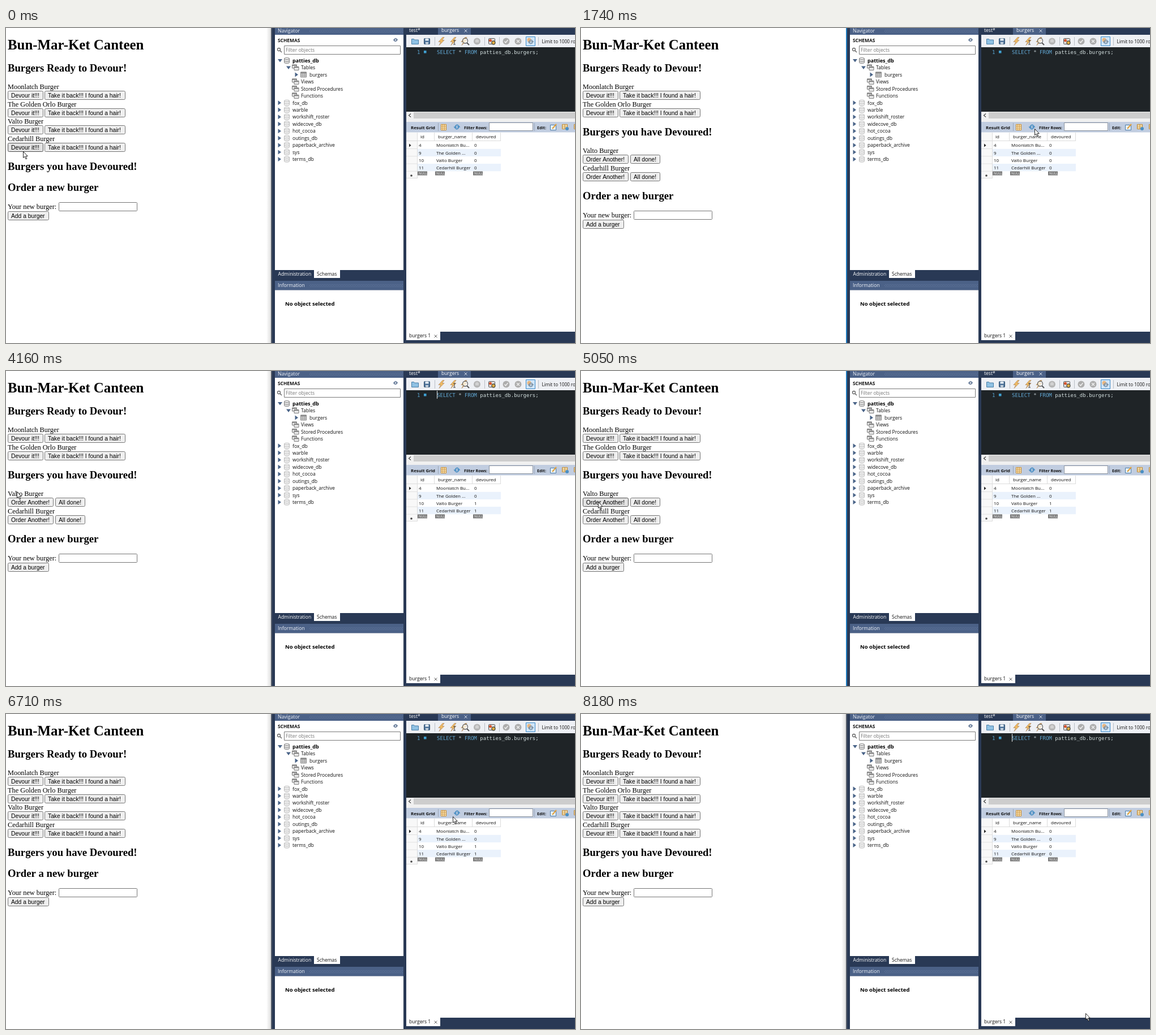
Write an HTML page with a canvas that moves like this. It is 1005 by 557 pixels and loops after 8270 ms.

```html
<!DOCTYPE html>
<html lang="en">
<head>
<meta charset="utf-8">
<title>Burger orders</title>
<style>
html, body { margin: 0; width: 100%; height: 100%; overflow: hidden; background: #fff; }
canvas { display: block; width: 1005px; height: 557px; }
</style>
</head>
<body>
<canvas width="1005" height="557"></canvas>
<script>
const c = document.querySelector('canvas').getContext('2d');
const LOOP = 8270;
const SANS = '"Open Sans", sans-serif', SERIF = '"Liberation Serif", serif';
const ARIAL = '"Liberation Sans", sans-serif', MONO = '"DejaVu Sans Mono", monospace';
const NAVY = '#293955', STEEL = '#4b6187', INK = '#111';

const BURGERS = ['Moonlatch', 'The Golden Orlo', 'Valto', 'Cedarhill'].map(n => n + ' Burger');
const SCHEMAS = ['fox_db', 'warble', 'workshift_roster', 'widecove_db', 'hot_cocoa',
  'outings_db', 'paperback_archive', 'sys', 'terms_db'];
const rowY = i => 57.5 + 12.47 * i;

// Pointer path: time, x, y
const PATH = [
  [0, 30, 218], [160, 30, 218], [550, 32, 176], [790, 32, 176], [1500, 816, 181],
  [1740, 801, 178], [2250, 798, 171], [2760, 798, 171], [3140, 647, 166], [3610, 23, 205],
  [3950, 5, 208], [4240, 22, 214], [4330, 22, 214], [4800, 30, 231], [5200, 30, 231],
  [5680, 38, 262], [5770, 38, 262], [5910, 39, 250], [6630, 789, 181], [6950, 789, 181],
  [7240, 792, 177], [7720, 792, 177], [7990, 752, 390], [8180, 891, 529], [LOOP, 891, 529]];
// Time, number of ready burgers
const READY = [[0, 4], [310, 3], [860, 2], [5120, 3], [5830, 4]];
const CLICKS = [[80, 230], [710, 860], [2370, 2520], [4880, 5030], [5680, 5830], [7250, 7480]];
const CARET = [[1820, 2110], [2640, 3170], [3700, 4230], [4760, 4880], [6750, 6870], [7950, LOOP]];
const PAGE_FOCUS = [[80, 1800], [4880, 6710]];
// Appear, fade start, fade end, x, y
const TIPS = [[2300, 2840, 3220, 797.5, 197.5], [7250, 7760, 8060, 791.5, 203.5]];

const within = (spans, t) => spans.some(([a, b]) => t >= a && t < b);
let tip;

function rect(x, y, w, h, fill, stroke, r = 0) {
  c.beginPath();
  c.roundRect(x, y, w, h, r);
  if (fill) { c.fillStyle = fill; c.fill(); }
  if (stroke) { c.strokeStyle = stroke; c.lineWidth = 1; c.stroke(); }
}
function text(s, x, y, size, color = INK, font = SANS, weight = '') {
  c.font = `${weight} ${size}px ${font}`;
  c.fillStyle = color;
  c.fillText(s, x, y);
}
const bold = (s, x, y, size, color, font) => text(s, x, y, size, color, font, 'bold');
function shape(d, x, y, fill, stroke, width = 1) {
  const p = new Path2D(d);
  c.save();
  c.translate(x, y);
  if (fill) { c.fillStyle = fill; c.fill(p); }
  if (stroke) { c.strokeStyle = stroke; c.lineWidth = width; c.stroke(p); }
  c.restore();
}
function disc(x, y, r, fill, stroke) {
  c.beginPath();
  c.arc(x, y, r, 0, 7);
  if (fill) { c.fillStyle = fill; c.fill(); }
  if (stroke) { c.strokeStyle = stroke; c.lineWidth = 1.3; c.stroke(); }
}
const cross = (x, y, color, width) => shape('M-2.5-2.5L2.5 2.5M2.5-2.5L-2.5 2.5', x, y, null, color, width);

// Monotone cubic through the path points
function pointer(t) {
  const slope = (i, k) => i < 0 || i > PATH.length - 2 ? 0 :
    (PATH[i + 1][k] - PATH[i][k]) / (PATH[i + 1][0] - PATH[i][0]);
  const tangent = (i, k) => {
    const a = slope(i - 1, k), b = slope(i, k);
    return a * b > 0 ? 2 * a * b / (a + b) : 0;
  };
  const i = Math.max(0, PATH.findIndex(p => p[0] > t) - 1);
  const p = PATH[i], q = PATH[i + 1], h = q[0] - p[0], u = (t - p[0]) / h;
  return [1, 2].map(k => {
    const s = u * u * (3 - 2 * u);
    return p[k] + (q[k] - p[k]) * s +
      h * u * (1 - u) * ((1 - u) * tangent(i, k) - u * tangent(i + 1, k));
  });
}

function button(label, x, y, w) {
  const hot = tip[0] >= x && tip[0] <= x + w && tip[1] >= y && tip[1] <= y + 16;
  rect(x + .5, y + .5, w - 1, 15, hot ? '#e2e2e2' : '#efefef', hot ? '#4f4f4f' : '#767676', 2);
  text(label, x + 6, y + 12, 10.3, '#000', ARIAL);
}

function drawPage(t) {
  const n = READY.filter(r => r[0] <= t).pop()[1], gone = BURGERS.slice(n);
  const h2 = (s, y) => bold(s, 3, y, 18.7, '#000', SERIF);
  const body = (s, y) => text(s, 3, y, 12.35, '#000', SERIF);
  rect(0, 0, 468, 557, '#fff');
  bold('Bun-Mar-Ket Canteen', 3, 38, 24.9, '#000', SERIF);
  h2('Burgers Ready to Devour!', 77);
  BURGERS.slice(0, n).forEach((b, i) => {
    const y = 108 + 30.5 * i;
    body(b, y);
    button('Devour it!!!', 3, Math.round(y + 3.2), 63);
    button('Take it back!!! I found a hair!', 68, Math.round(y + 3.2), 143);
  });
  const top = 128.5 + 30.5 * n;
  h2('Burgers you have Devoured!', top);
  gone.forEach((b, i) => {
    const y = top + 31.5 + 30.5 * i;
    body(b, y);
    button('Order Another!', 3, Math.round(y + 3.2), 81);
    button('All done!', 87, Math.round(y + 3.2), 53);
  });
  const order = Math.round(top + 37 + (gone.length ? 15.5 + 30.5 * gone.length : 0));
  h2('Order a new burger', order);
  body('Your new burger:', order + 32);
  rect(93.5, order + 20.5, 138, 15, '#fff', '#767676', 1);
  button('Add a burger', 3, order + 36, 73);
}

function header(s, y, h, base) {
  rect(475, y, 227, h, STEEL);
  c.fillStyle = '#6c80a2';
  for (let x = 536; x < 699; x += 3)
    for (let k = -1; k < 2; k++) c.fillRect(x + (k & 1) * 1.5, base - 3 + k * 2, 1, 1);
  text(s, 480, base, 8.6, '#f2f5fa');
}
function database(x, y, on) {
  const line = on ? '#777' : '#b5b5b5';
  shape('M-4.5-3.5V3.5C-4.5 5.5 4.5 5.5 4.5 3.5V-3.5', x, y, on ? '#ddd' : '#eee', line, .9);
  shape('M-4.5-3.5C-4.5-5.5 4.5-5.5 4.5-3.5S-4.5-1.5-4.5-3.5M-4.5 0C-4.5 2 4.5 2 4.5 0', x, y, '#f7f7f7', line, .9);
}
function tables(x, y) {
  for (const d of [0, 3.5]) {
    rect(x - 5.5 + d, y - 5 + d, 8, 6, '#eee', '#777');
    rect(x - 5.5 + d, y - 5 + d, 8, 2, '#888');
  }
}
const arrowRight = (x, y) => shape('M-2.5-4L3 0L-2.5 4Z', x, y, '#4a6488');
const arrowDown = (x, y) => shape('M-4-2.5H4L0 3Z', x, y, '#4a6488');

// Two curved arrows chasing each other
function cycle(x, y, s, color) {
  for (const turn of [0, Math.PI]) {
    c.save();
    c.translate(x, y);
    c.rotate(turn);
    c.scale(s, s);
    shape('M-.55 0A.6.6 0 0 1 .4-.5', 0, 0, null, color, .35);
    shape('M-1.1-.1H0L-.55.6Z', 0, 0, color);
    c.restore();
  }
}

function drawNavigator() {
  rect(469, 0, 536, 557, NAVY);
  rect(475, 11, 227, 417, '#fff');
  header('Navigator', 0, 12, 8);
  bold('SCHEMAS', 480, 25, 8.4);
  cycle(688, 21, 4, '#5b7191');
  disc(482, 38, 2.5, null, '#666');
  shape('M2 2L5 5', 482, 38, null, '#666', 1.5);
  rect(491.5, 31.5, 205, 15, '#fff', '#7a7a7a');
  text('Filter objects', 494, 42.2, 8.6, '#777');

  arrowDown(484, rowY(0));
  database(496, rowY(0), true);
  bold('patties_db', 506, rowY(0) + 3.2, 9, '#000');
  arrowDown(499, rowY(1));
  ['Tables', , 'Views', 'Stored Procedures', 'Functions'].forEach((s, i) => {
    tables(511, rowY(i + 1));
    text(s, 521, rowY(i + 1) + 3.2, 8.6);
  });
  arrowRight(513, rowY(2));
  rect(520.5, rowY(2) - 4.5, 10, 9, '#ccc', '#888');
  shape('M0 3H10M0 6H10M3.5 0V9M7 0V9', 520.5, rowY(2) - 4.5, null, '#999', .7);
  rect(520.5, rowY(2) - 4.5, 10, 2, '#888');
  text('burgers', 536, rowY(2) + 3.2, 8.6);
  SCHEMAS.forEach((s, i) => {
    const y = rowY(i + 6);
    arrowRight(483, y);
    database(496, y);
    text(s, 506, y + 3.2, 8.6);
  });
  const row = Math.round((tip[1] + 3 - rowY(0)) / 12.47);
  if (tip[0] > 475 && tip[0] < 702 && row >= 6 && row < 15) {
    disc(685.5, rowY(row), 4.5, '#8c8c8c');
    bold('i', 684.2, rowY(row) + 3, 8, '#fff', SERIF);
    disc(696.5, rowY(row), 4.5, '#8c8c8c');
    shape('M-2-2L2 2', 696.5, rowY(row), null, '#fff', 1.6);
  }

  text('Administration', 480.5, 438, 8.5, '#fff');
  rect(544, 428, 46, 14, '#fff');
  text('Schemas', 549, 438, 8.5);
  header('Information', 447, 16.5, 458);
  rect(475, 463.5, 227, 94, '#fff');
  bold('No object selected', 493, 491, 9.5, '#000');
}

function drawToolbar() {
  rect(707, 12, 298, 22, '#eef0f4');
  const bolt = x => shape('M2-7L-5 1H-1L-4 7L5-2H1L5-7Z', x, 23.5, '#f3bd62', '#a8805a', .7);
  shape('M-6-4H-2L-1-2.5H6V5H-6Z', 722.5, 23.5, '#8fc1e3', '#477da6');
  rect(738.5, 18.5, 10, 10, '#4d7198', '#31506f', 1);
  rect(740.5, 18.5, 6, 4, '#e4ecf3');
  rect(741, 25, 5, 3.5, '#cbd7e2');
  bolt(769);
  bolt(790);
  shape('M1-2V5M-1-2H3M-1 5H3', 791, 24, null, '#444');
  bolt(809);
  disc(811, 22.5, 4.5, '#ffffffb0', '#666');
  shape('M3 3L7 7', 811, 23, null, '#555', 2);
  disc(832, 23.5, 6, '#b5b5b5');
  shape('M-2 2V-3M0 2V-4M2 2V-3', 832, 23.5, null, '#eee');
  rect(852.5, 18.5, 11, 10, '#ddd', '#555', 1);
  disc(855.5, 22, 2.5, '#d8552f');
  disc(861, 26, 3, '#f0b03f', '#554');
  disc(883.5, 23.5, 6, '#adadad');
  shape('M-3 0L-1 2.5L3-2.5', 883.5, 23.5, null, '#eee', 1.5);
  disc(904.5, 23.5, 6, '#adadad');
  cross(904.5, 23.5, '#eee', 1.5);
  rect(918.5, 15.5, 16, 16, '#cfe5f8', '#3c8ac8');
  disc(924, 21, 3.5, '#e8b680');
  cycle(927, 24.5, 5, '#7f93a6');
  for (const x of [757, 845, 871, 940]) rect(x, 16, 1, 15, '#b9bec6');
  text('Limit to 1000 rows', 946.5, 27, 8.1);
}

function drawEditor(t) {
  text('test*', 712, 7, 8.6, '#fff');
  rect(763, 0, 58, 12, STEEL);
  text('burgers', 769, 7, 8.6, '#fff');
  cross(812, 5, '#cdd5e2');
  drawToolbar();

  rect(707, 34, 298, 114, '#1f2427');
  text('1', 726, 46, 9, '#5aa4d0', MONO);
  rect(738, 40, 4.5, 4.5, '#3f9fd0');
  let x = 761;
  for (const [s, color] of [['SELECT', '#62a9d6'], [' * ', '#b9c4c8'], ['FROM', '#62a9d6'], [' patties_db.burgers;', '#d3dfdf']]) {
    text(s, x, 46, 9.06, color, MONO);
    x += c.measureText(s).width;
  }
  if (within(CARET, t)) rect(761, 35, 1, 14, '#e8e8e8');
  rect(707, 148, 298, 18, '#f0f0f0');
  rect(720, 149, 285, 11, '#cdcdcd');
  shape('M2-3L-1.5 0L2 3', 713, 154.5, null, '#444', 1.2);
}

function drawResults(t) {
  rect(707, 166, 298, 371, '#fff');
  rect(707, 166, 298, 18.5, '#c1cde0');
  bold('Result Grid', 715, 178.5, 7.8);
  rect(768.5, 170.5, 9, 10, '#fff3d0', '#c88a2d');
  shape('M0 3H9M0 6.5H9M3 0V10M6 0V10', 768.5, 170.5, null, '#c88a2d', .9);
  cycle(796.5, 175, 5.5, '#4b8fc4');
  bold('Filter Rows:', 809, 178.5, 7.1);
  rect(853.5, 167.5, 77, 14, '#fff', '#8a929e');
  bold('Edit:', 938, 178.5, 7.2);
  for (const x of [763, 933]) rect(x, 168, 1, 14, '#9aa7ba');
  rect(961.5, 171.5, 10, 9, '#e4f0fa', '#4d7ca8');
  shape('M-3 4L4-4', 968, 174, null, '#e2a03a', 2);
  for (const x of [982, 1003]) {
    rect(x + .5, 170.5, 9, 8, '#fff0c8', '#b9822e');
    shape('M0 2.7H9M0 5.4H9M4.5 0V8', x + .5, 170.5, null, '#b9822e', .8);
    disc(x + 9, 178, 3, '#4b8fc4');
  }

  rect(707, 185, 20, 80, '#f8f8f8');
  const line = '#dcdcdc';
  for (const x of [726, 756, 823, 873]) rect(x, 185, 1, 14, line);
  rect(726, 185, 1, 80, line);
  rect(707, 199, 167, 1, line);
  text('id', 732, 195, 8);
  text('burger_name', 763, 195, 8);
  text('devoured', 830, 195, 8);
  const flag = t >= 2600 && t < 7480 ? '1' : '0';
  ['Moonlatch Bu...', 'The Golden ...', ...BURGERS.slice(2)].forEach((name, i) => {
    const y = 200.5 + 13.2 * i;
    if (i % 2) rect(727, y, 147, 13.2, '#eaf2fc');
    rect(707, y + 12.7, 20, .8, line);
    text([4, 9, 10, 11][i], 729, y + 9.8, 8);
    text(name, 760, y + 9.8, 8);
    text(i < 2 ? '0' : flag, 827, y + 9.8, 8);
  });
  for (const x of [727, 758, 825]) {
    rect(x, 253.5, 17, 7, '#777');
    text('NULL', x + 2, 259.4, 6, '#fff');
  }
  shape('M-1.5-3L2 0L-1.5 3Z', 713.5, 207.5, '#222');
  rect(707, 265, 20, 1, line);
  disc(716, 261, 1.8, '#444');

  rect(707, 537, 60, 15, '#fff');
  text('burgers 1', 712, 547, 8.6);
  cross(759, 545, '#666');
}

function drawEdge(t) {
  const page = within(PAGE_FOCUS, t);
  if (!page) {
    const g = c.createLinearGradient(460, 0, 468, 0);
    g.addColorStop(0, '#0000');
    g.addColorStop(1, '#0002');
    rect(460, 0, 8, 557, g);
  }
  rect(468, 0, 2, 557, page ? '#1f7cc0' : '#555d6b');
}

function drawTip([on, fade, off, x, y], t) {
  if (t < on || t > off) return;
  c.globalAlpha = Math.min(1, (off - t) / (off - fade));
  rect(x + 2, y + 2, 190, 15, '#0004');
  rect(x, y, 190, 15, '#fff', '#767676');
  text('Refresh data re-executing the original query', x + 4.5, y + 10.8, 8.8, '#575757');
  c.globalAlpha = 1;
}

function draw(t) {
  tip = pointer(t);
  drawPage(t);
  drawNavigator();
  drawEditor(t);
  drawResults(t);
  drawEdge(t);
  TIPS.forEach(p => drawTip(p, t));
  if (within(CLICKS, t)) disc(tip[0] + .5, tip[1] + 3, 10.5, '#e6dc3cc0');
  shape('M.5.5V11.5L3 9.2L5 13.8L6.8 13L4.9 8.6H8.3Z', ...tip, '#fff', '#111', .9);
}

function tick(now) {
  draw(now % LOOP);
  requestAnimationFrame(tick);
}
requestAnimationFrame(tick);
</script>
</body>
</html>
```
